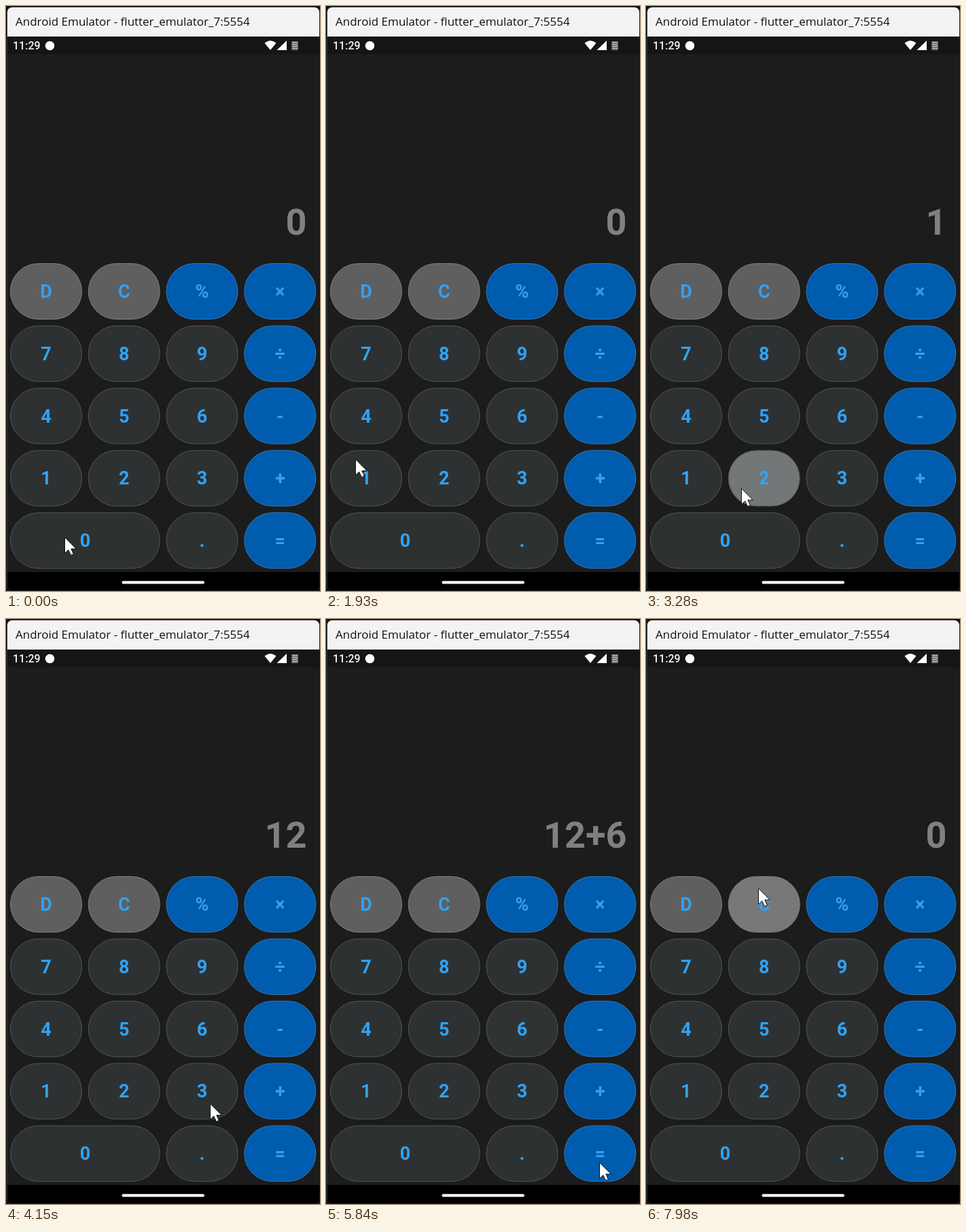
Recreate the animation shown at these times as an HTML page. Size 462 by 862 pixels, loop 8000 ms.

```html
<!DOCTYPE html>
<html lang="en">
<head>
<meta charset="utf-8">
<title>Calculator</title>
<style>
  html, body { margin: 0; width: 100%; height: 100%; overflow: hidden; background: #141414; }
  svg { display: block; width: 100vw; height: 100vh; }
  .title { font: 17px "Open Sans", "Noto Sans", sans-serif; fill: #111; }
  .clock { font: 500 16px Roboto, sans-serif; fill: #f4f4f4; }
  .label { font: bold 27px Roboto, sans-serif; text-anchor: middle; }
  .display { font: bold 54px Roboto, sans-serif; text-anchor: end; fill: #808080; }
</style>
</head>
<body>
<svg viewBox="0 0 462 862">
  <rect width="462" height="862" fill="#141414"/>
  <rect x="1" y="1" width="460" height="860" rx="8" fill="#333"/>
  <path d="M2 45V10Q2 2 10 2H453Q461 2 461 10V45Z" fill="#f3f3f3"/>
  <text class="title" x="14" y="29">Android Emulator - flutter_emulator_7:5554</text>

  <rect x="2" y="45" width="459" height="27" fill="#141515"/>
  <rect x="2" y="71" width="459" height="763" fill="#1c1c1c"/>
  <path d="M2 834H461V853Q461 861 453 861H10Q2 861 2 853Z" fill="#000"/>
  <rect x="170.5" y="847.2" width="121.5" height="4.3" rx="2.1" fill="#f5f5f5"/>

  <text class="clock" x="10" y="64">11:29</text>
  <circle cx="64.5" cy="58.5" r="6.8" fill="#fff"/>
  <path d="M380.5 54.5Q389 47.5 397.5 54.5L389 65Z" fill="#fff"/>
  <path d="M413 51V65H398.5Z" fill="#fff"/>
  <rect x="420.5" y="52" width="9" height="13" fill="#777"/>
  <path d="M420.5 53.5h9m-9 3h9m-9 3h9m-9 3h9" stroke="#bbb"/>

  <text class="display" id="display" x="442.5" y="337">0</text>
  <g id="keys"></g>
  <path id="cursor" d="M.5 1V24.4L5.8 19.4L9.5 27.4L13.3 25.7L9.8 17.9H17.3Z"
        fill="#fff" stroke="#000" stroke-width=".9" stroke-linejoin="round"/>
</svg>
<script>
const LOOP = 8000;
const RELEASE = 220;
const NS = "http://www.w3.org/2000/svg";
const byId = id => document.getElementById(id);

// Each move eases the pointer from where it rests to a new place.
const home = { x: 86, y: 782 };
const moves = [
  { from: 380, to: 720, x: -20, y: 475 },
  { from: 1690, to: 1930, x: 43, y: 667 },
  { from: 1930, to: 2080, x: 43, y: 684 },
  { from: 2640, to: 2960, x: 140, y: 710 },
  { from: 3525, to: 3910, x: 289, y: 714 },
  { from: 4110, to: 4310, x: 390, y: 707 },
  { from: 4640, to: 4860, x: 300, y: 610 },
  { from: 5520, to: 5840, x: 402, y: 800 },
  { from: 6980, to: 7360, x: 165, y: 396 }
];

const taps = [
  { key: "1", at: 2330 }, { key: "2", at: 3140 }, { key: "+", at: 4310 },
  { key: "6", at: 5270 }, { key: "=", at: 6230 }, { key: "C", at: 7740 }
];

const themes = {
  dark: { fill: "#2d3132", edge: "#535657", ink: "#2fa3f8" },
  gray: { fill: "#5f5f5f", edge: "#808080", ink: "#2fa0f4" },
  blue: { fill: "#005cae", edge: "#3079ba", ink: "#34a0f0" }
};

function add(parent, tag, attrs) {
  const el = document.createElementNS(NS, tag);
  for (const name in attrs) el.setAttribute(name, attrs[name]);
  return parent.appendChild(el);
}

const overlays = {};

function addKey(name, col, row, span) {
  const theme = themes[col === 3 || name === "%" ? "blue" : row === 0 ? "gray" : "dark"];
  const box = {
    x: 6.5 + col * 114.75, y: 379.5 + row * 91.8,
    width: 105 + (span - 1) * 114.75, height: 82, rx: 41
  };
  const keys = byId("keys");
  add(keys, "rect", { ...box, fill: theme.fill });
  overlays[name] = add(keys, "rect", { ...box, fill: "#fff", opacity: 0 });
  add(keys, "rect", { ...box, fill: "none", stroke: theme.edge });
  add(keys, "text", {
    class: "label", x: box.x + box.width / 2, y: box.y + 50.5, fill: theme.ink
  }).textContent = name;
}

["DC%×", "789÷", "456-", "123+", "0 .="].forEach((line, row) =>
  [...line].forEach((name, col) => {
    if (name !== " ") addKey(name, col, row, name === "0" ? 2 : 1);
  }));

const clamp = v => Math.min(1, Math.max(0, v));
const ease = u => u * u * (3 - 2 * u);

function pointerAt(t) {
  let { x, y } = home;
  for (const move of moves) {
    const u = ease(clamp((t - move.from) / (move.to - move.from)));
    x += (move.x - x) * u;
    y += (move.y - y) * u;
  }
  return { x, y };
}

// Highlight of a pressed key: quick rise, then exponential fade.
function glow(age) {
  return .34 * clamp((age + 60) / 200) * Math.exp(-Math.max(0, age - 140) / 130);
}

function type(shown, key) {
  if (key === "C") return "0";
  if (key === "=") return String(shown.split("+").reduce((sum, n) => sum + Number(n), 0));
  return shown === "0" ? key : shown + key;
}

function draw(t) {
  const { x, y } = pointerAt(t);
  byId("cursor").setAttribute("transform", `translate(${x.toFixed(1)} ${y.toFixed(1)})`);
  for (const { key, at } of taps) overlays[key].setAttribute("opacity", glow(t - at).toFixed(3));
  byId("display").textContent = taps
    .filter(({ at }) => t >= at + RELEASE)
    .reduce((shown, { key }) => type(shown, key), "0");
}

function frame() {
  draw(performance.now() % LOOP);
  requestAnimationFrame(frame);
}
frame();
</script>
</body>
</html>
```
